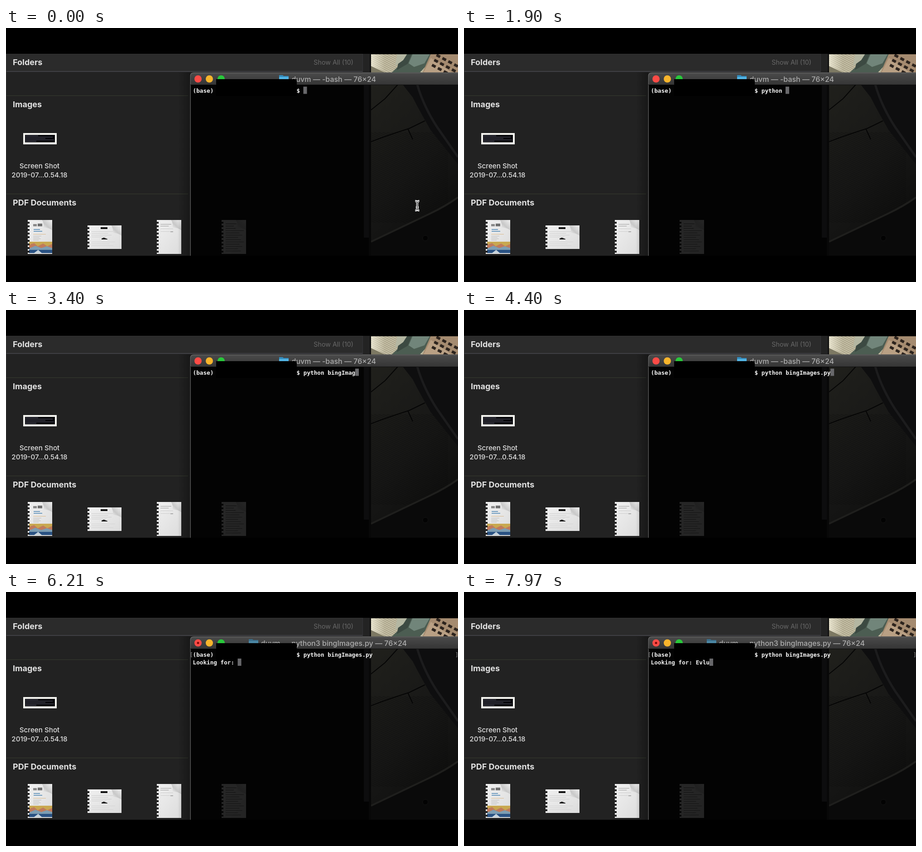
Write an HTML page that moves like this. It is 998 by 561 pixels and loops after 8 s.

```html
<!DOCTYPE html>
<html lang="en">
<head>
<meta charset="utf-8">
<title>Terminal session</title>
<style>
  html, body { margin: 0; width: 100%; height: 100%; overflow: hidden; background: #000; }
  svg { display: block; width: 998px; height: 561px; }
  text { font-family: Inter, "Open Sans", sans-serif; white-space: pre; }
  .head { font-size: 18px; font-weight: 700; fill: #e2e2e2; }
  .label { font-size: 15.2px; font-weight: 500; fill: #e2e2e2; text-anchor: middle; }
  .title { font-size: 16px; font-weight: 500; fill: #adadad; text-anchor: end; }
  .mono { font: bold 12.68px "DejaVu Sans Mono", monospace; fill: #f4f4f4; }
  .bracket { font-weight: 400; fill: #858585; }
</style>
</head>
<body>
<svg viewBox="0 0 998 561">
  <defs>
    <clipPath id="screen"><rect y="57" width="998" height="446"/></clipPath>
    <clipPath id="photoTop"><rect x="806" y="58" width="192" height="40"/></clipPath>
    <clipPath id="photoLow"><rect x="806" y="125" width="192" height="378"/></clipPath>
    <linearGradient id="bar" x2="0" y2="1">
      <stop stop-color="#4b4b4b"/><stop offset="1" stop-color="#353535"/>
    </linearGradient>
    <linearGradient id="shade" x2="1" y2="0">
      <stop stop-color="#000" stop-opacity="0"/><stop offset="1" stop-color="#000" stop-opacity=".3"/>
    </linearGradient>
    <linearGradient id="floor" x2=".5" y2="1">
      <stop stop-color="#20201c"/><stop offset=".6" stop-color="#171716"/><stop offset="1" stop-color="#0e0e0d"/>
    </linearGradient>
    <linearGradient id="paper" x2="1" y2="1">
      <stop stop-color="#f0f0f0"/><stop offset="1" stop-color="#dcdcdc"/>
    </linearGradient>
    <linearGradient id="curl" x1="0" y1="1" x2="1" y2="0">
      <stop stop-color="#fafafa"/><stop offset=".45" stop-color="#c8c8c8"/><stop offset="1" stop-color="#f0f0f0"/>
    </linearGradient>
    <linearGradient id="weaveLight" x2="1" y2="0">
      <stop stop-color="#fffbe8" stop-opacity=".65"/><stop offset=".3" stop-color="#fffbe8" stop-opacity="0"/>
    </linearGradient>
    <pattern id="weave" width="5" height="4" patternUnits="userSpaceOnUse" patternTransform="rotate(28)">
      <rect width="5" height="4" fill="#c4bea4"/><path d="M0 .5H5" stroke="#958e76"/>
    </pattern>
    <pattern id="ridges" width="6" height="4" patternUnits="userSpaceOnUse" patternTransform="rotate(25)">
      <path d="M0 1H6" stroke="#060606"/>
    </pattern>
  </defs>

  <g clip-path="url(#screen)">
    <!-- file browser -->
    <rect y="57" width="806" height="446" fill="#222222"/>
    <rect y="57" width="787" height="39" fill="#2b2b2b"/>
    <path d="M0 57.5H806" stroke="#343434"/>
    <path d="M0 96H787" stroke="#48484f" stroke-width="1.3"/>
    <path d="M0 149.5H402M0 366.5H402" stroke="#383d30"/>
    <path d="M.5 57V503" stroke="#363636"/>
    <rect x="787" y="57" width="17" height="41" fill="#232323"/>
    <path d="M787.5 57V98" stroke="#343438"/>
    <path d="M804.5 57V98" stroke="#0b0b0b" stroke-width="2"/>
    <text class="head" x="15" y="82">Folders</text>
    <text class="head" x="15" y="175">Images</text>
    <text class="head" x="15" y="392">PDF Documents</text>
    <text x="767" y="81" font-size="14.3" fill="#686868" text-anchor="end">Show All (10)</text>
    <rect x="38" y="232" width="74" height="25" fill="#f5f5f0"/>
    <rect x="42" y="236" width="66" height="16.5" fill="#08080c"/>
    <g id="shotLines" stroke="#555563" stroke-width="1.2"></g>
    <text class="label" x="74" y="310">Screen Shot</text>
    <text class="label" x="74" y="330">2019-07...0.54.18</text>
    <g id="docs"></g>
    <rect x="379" y="98" width="28" height="405" fill="url(#shade)"/>

    <!-- picture behind the windows -->
    <g clip-path="url(#photoTop)">
      <rect x="806" y="57" width="192" height="41" fill="url(#weave)"/>
      <rect x="806" y="57" width="100" height="41" fill="url(#weaveLight)"/>
      <path d="M806 84l30 14h-30z" fill="#7d7963"/>
      <path d="M852 98l16-15 16-26h56l-8 22-18 19z" fill="#4c5d52"/>
      <path d="M898 57h38l-12 21-23 8-12-8z" fill="#71857a"/>
      <path d="M870 57h26l-9 22-24 14z" fill="#3c4a42"/>
      <path d="M864 57h22l-9 14-18 13z" fill="#b4b7a2"/>
      <path d="M938 57h60v41h-78z" fill="#a58b70"/>
      <path d="M938 66l46 32h-62z" fill="#b9a084"/>
      <g id="holes" fill="#2d241e"></g>
    </g>

    <!-- terminal window -->
    <path d="M406 503V106q0-8 8-8h584v405z" fill="#030303"/>
    <rect x="790" y="125" width="11" height="338" fill="#0d0d0e"/>
    <rect x="801" y="125" width="5" height="378" fill="#080808"/>
    <g clip-path="url(#photoLow)">
      <rect x="806" y="125" width="192" height="378" fill="url(#floor)"/>
      <rect x="806" y="230" width="170" height="200" fill="url(#ridges)" opacity=".5"/>
      <path d="M876 125l22 28q14 28 40 73l60 75V125z" fill="#0e0e0f"/>
      <path d="M908 125q14 48 44 94l46 66" fill="none" stroke="#1c1c1d" stroke-width="5"/>
      <path d="M806 251q45-17 84-29l35-17M806 181l31-25 28-31M887 222l11 24" fill="none" stroke="#050505" stroke-width="2"/>
      <path d="M806 470l130-62q34-16 62-36v131H806z" fill="#0a0a0a"/>
      <path d="M806 472l130-62q34-16 62-36" fill="none" stroke="#1f1f1d" stroke-width="4"/>
      <circle cx="926" cy="464" r="6" fill="#030303" stroke="#141414"/>
    </g>
    <path d="M407 125V106q0-7 7-7h584v26z" fill="url(#bar)"/>
    <path d="M407.2 503V106q0-7 7-7H998" fill="none" stroke="#6b6b6b" stroke-width="1.3"/>
    <path d="M407 125.5H998" stroke="#101010"/>
    <circle cx="424" cy="112.5" r="8" fill="#fc4b46"/>
    <circle cx="449" cy="112.5" r="8" fill="#f8b52c"/>
    <circle cx="475" cy="112.5" r="8" fill="#29c73b"/>
    <circle id="busy" cx="424" cy="112.5" r="2.5" fill="#7a0807"/>
    <g id="folder">
      <path d="M0 104h8l2 2h11v14H0z" fill="#3388b8"/>
      <path d="M0 108h21v12H0z" fill="#52b4e4"/>
    </g>
    <text id="title" class="title" y="119"></text>
    <rect x="464" y="113" width="178" height="37" fill="#000"/>

    <text class="mono" x="412.5" y="143">(base)</text>
    <text class="mono" x="641.5" y="143">$ <tspan id="command"></tspan></text>
    <text class="mono" id="answer" x="412.5" y="159.5"></text>
    <g id="brackets">
      <text class="mono bracket" x="405.5" y="143">[</text>
      <text class="mono bracket" x="991.5" y="143">]</text>
    </g>
    <rect id="caret" width="8" height="16" fill="#68686b"/>
    <g id="pointer" fill="none">
      <path id="beam" d="M903.5 382q4.5 0 4.5 4v13q0 4-4.5 4M912.5 382q-4.5 0-4.5 4v13q0 4 4.5 4M905 396h6" stroke="#f2f2f2" stroke-width="4.5"/>
      <use href="#beam" style="display:none"/>
      <path d="M904 382.5q4 0 4 4v12q0 4-4 4M912 382.5q-4 0-4 4v12q0 4 4 4" stroke="#222" stroke-width="1"/>
    </g>
  </g>
</svg>

<script>
const byId = id => document.getElementById(id);
const repeat = (n, make) => Array.from({ length: n }, (_, i) => make(i)).join("");
const box = (x, y, w, h, fill) => `<rect x="${x}" y="${y}" width="${w}" height="${h}" fill="${fill}"/>`;

// A page with a spiral binding on the left and a curled corner.
function page(x, y, w, h, content) {
  const c = 22;
  return `<g transform="translate(${x} ${y})">
    <path d="M0 0H${w - c}L${w} ${c}V${h}H0z" fill="url(#paper)"/>
    ${content}
    <path d="M${w - c} 0q5 11 2 17 9-1 20 5V0z" fill="url(#curl)"/>
    ${repeat(Math.floor(h / 8), i => box(0, 4 + i * 8, 4, 4, "#191919"))}
  </g>`;
}
const rows = (n, x, y, w, gap, fill) =>
  repeat(n, i => box(x, y + i * gap, w * (1 - (i * 3 % 5) * .08), 1, fill));

const cover = box(12, 9, 8, 5, "#8a8a8a") + box(22, 8, 10, 6, "#707070") +
  box(13, 20, 14, 2, "#6f9cc0") + box(13, 24, 19, 2, "#6f9cc0") +
  box(12, 31, 28, 1, "#d9b98c") + rows(4, 12, 35, 18, 3, "#bdbdbd") +
  box(3, 48, 51, 14, "#c9a850") + box(3, 61, 51, 12, "#2a5283") +
  `<path d="M3 55l11-4 8 7 12-6 9 6 11-5v9H3z" fill="#c07a5c"/>
   <path d="M3 63l14-6 13 5 12-4 12 4v4H3z" fill="#7d9db2"/>
   <path d="M14 73l9-7 8 7z" fill="#c3d0da"/>`;
const form = box(29, 4, 15, 4, "#111") + rows(4, 9, 13, 48, 4, "#cdcdcd") +
  `<path d="M31 29l5-2 8 3v1H31z" fill="#111"/>` + rows(3, 9, 36, 52, 4, "#d4d4d4");
const letter = rows(2, 8, 9, 24, 4, "#9a9a9a") + rows(2, 8, 19, 28, 6, "#cdcdcd") +
  box(30, 25, 6, 2, "#aaa");
const report = rows(3, 9, 8, 24, 5, "#555") + rows(10, 9, 23, 40, 5, "#777");

byId("docs").innerHTML = page(48, 424, 54, 75, cover) + page(180, 436, 75, 52, form) +
  page(333, 424, 54, 75, letter);
byId("caret").insertAdjacentHTML("beforebegin", `<g opacity=".15">${page(476, 424, 54, 75, report)}</g>`);
byId("shotLines").innerHTML = repeat(5, i => `<path d="M43 ${238 + i * 3}h${[28, 60, 44, 63, 24][i]}"/>`);
byId("holes").innerHTML = repeat(15, i => {
  const row = Math.floor(i / 5), col = i % 5;
  return `<rect width="9" height="6" transform="translate(${952 + col * 13 - row * 5} ${57 + col * 7 + row * 11}) rotate(28)"/>`;
});

const LOOP = 8000, CHAR = 7.635;
const COMMAND = "python bingImages.py", PROMPT = "Looking for: ", SEARCH = "Evlu";
const commandKeys = [500, 660, 820, 980, 1120, 1260, 1440, 2050, 2200, 2350,
  2500, 2750, 2950, 3120, 3300, 3480, 3650, 3850, 4020, 4200];
const searchKeys = [6900, 7180, 7430, 7700];
const ENTER = 5000, RUNNING = 5080, PROMPTED = 5550;

const typed = (text, keys, t) => text.slice(0, keys.filter(k => k <= t).length);
const show = (id, on) => byId(id).setAttribute("visibility", on ? "visible" : "hidden");

function draw(t) {
  const command = typed(COMMAND, commandKeys, t);
  const answer = t < PROMPTED ? "" : PROMPT + typed(SEARCH, searchKeys, t);
  const entered = t >= ENTER, running = t >= RUNNING;
  byId("command").textContent = command;
  byId("answer").textContent = answer;
  byId("title").textContent = `duvm — ${running ? "python3 bingImages.py" : "-bash"} — 76×24`;
  byId("title").setAttribute("x", running ? 885 : 817);
  byId("folder").setAttribute("transform", `translate(${running ? 536 : 603} 0)`);
  byId("folder").setAttribute("opacity", running ? .6 : 1);
  byId("caret").setAttribute("x", entered ? 412.3 + answer.length * CHAR : 656.5 + command.length * CHAR);
  byId("caret").setAttribute("y", entered ? 147 : 129.5);
  show("busy", running);
  show("brackets", entered);
  show("pointer", t < commandKeys[0]);
}

const start = performance.now();
function tick() {
  draw((performance.now() - start) % LOOP);
  requestAnimationFrame(tick);
}
tick();
</script>
</body>
</html>
```
